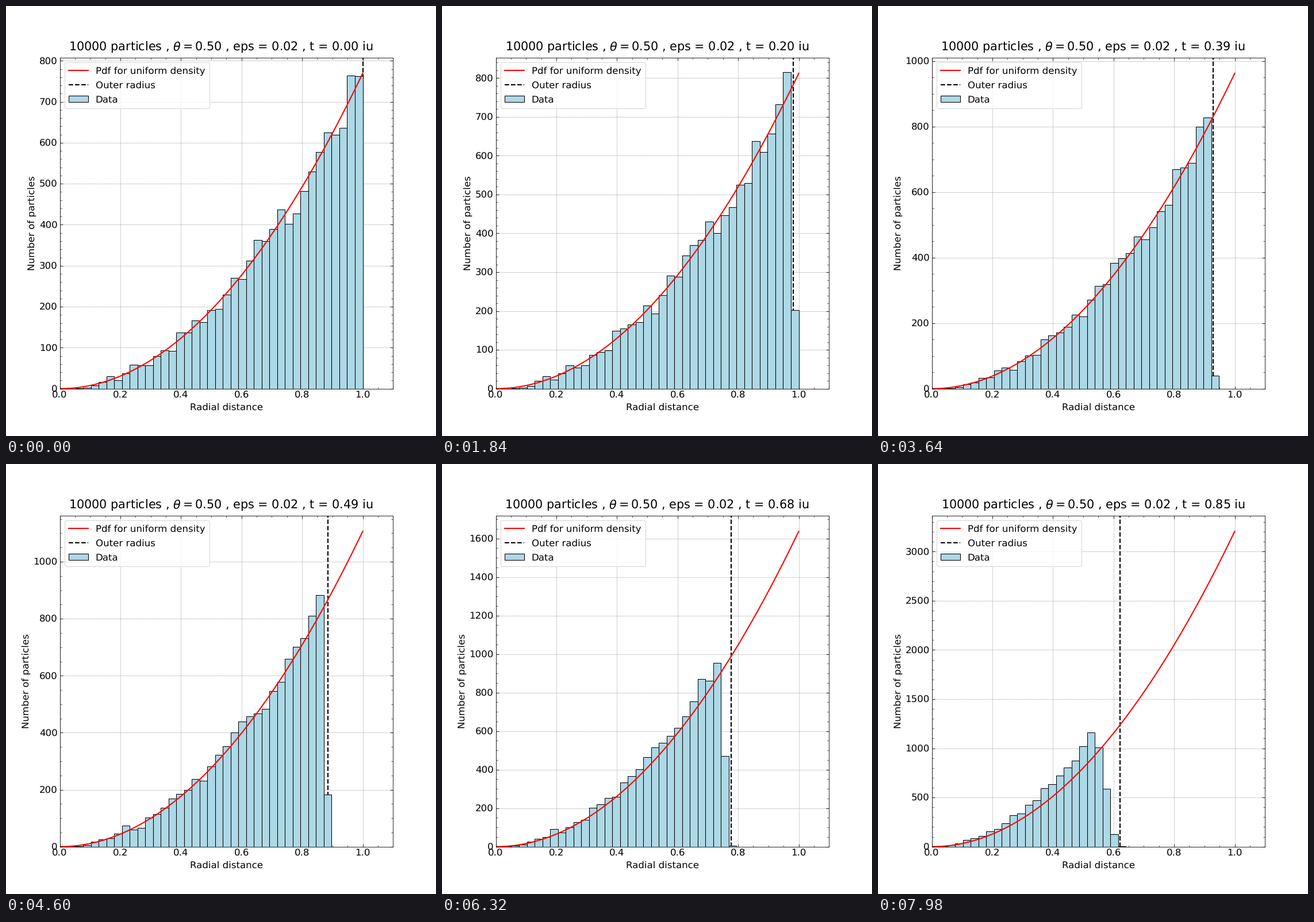
A matplotlib script for the animation above (8000 ms loop, 748 by 748 pixels).

```python
import numpy as np
import matplotlib.pyplot as plt
from matplotlib.animation import FuncAnimation
from matplotlib.ticker import AutoMinorLocator

N, BINS, STEPS = 10000, 39, 171
FRAMES, INTERVAL = 200, 40

plt.rcParams.update({
    "font.family": "DejaVu Sans", "font.size": 16, "text.hinting": "none",
    "xtick.direction": "in", "ytick.direction": "in",
    "xtick.top": True, "ytick.right": True,
    "xtick.major.size": 5, "ytick.major.size": 5,
    "xtick.minor.size": 3, "ytick.minor.size": 3,
    "xtick.major.pad": 4, "axes.labelpad": 4.8,
    "axes.axisbelow": True,
})

edges = np.linspace(0, 1, BINS + 1)
width = edges[1]

# Uniform sphere of particles, each with its own random drift
rng = np.random.default_rng(7)
start = rng.random(N) ** (1 / 3)
drift = rng.standard_normal(N)


def outer_radius(u):
    v = u * u
    return 1 - v * (0.3375 + 0.01875 * v - 0.0136 * v**2 + 0.0359 * v**3)


def radii(u):
    """The sphere shrinks evenly while its edge grows softer."""
    outer = outer_radius(u)
    halo = 0.047 * u**3.15
    r = start * (outer - halo) + 0.43 * halo * drift
    return np.minimum(np.abs(r), outer)


fig, ax = plt.subplots(figsize=(10, 10), dpi=74.8)
bars = ax.bar(edges[:-1], np.zeros(BINS), width, align="edge",
              color="lightblue", edgecolor="black", lw=1, label="Data",
              zorder=1)
x = np.linspace(0, 1, 200)
pdf, = ax.plot(x, x, "r", lw=2, label="Pdf for uniform density")
outer_line = ax.axvline(1, color="black", ls="--", lw=2,
                        label="Outer radius", zorder=0.9)
ax.set_xlim(0, 1.1)
ax.set_xlabel("Radial distance")
ax.set_ylabel("Number of particles")
ax.xaxis.set_minor_locator(AutoMinorLocator())
ax.yaxis.set_minor_locator(AutoMinorLocator())
ax.grid(color="gray", ls="--", lw=0.5)
ax.legend(loc="upper left", labelspacing=0.565, borderpad=0.45)
title = fig.suptitle("", y=0.92, fontsize=20)


def draw(frame):
    step = int((frame + 0.5) * STEPS / FRAMES)
    u = step / (STEPS - 1)
    radius = outer_radius(u)
    counts, _ = np.histogram(radii(u), edges)
    for bar, n in zip(bars, counts):
        bar.set_height(n)
    peak = 3 * N * width / radius**3
    pdf.set_ydata(peak * x**2)
    outer_line.set_xdata([radius, radius])
    ax.set_ylim(0, 1.05 * peak)
    title.set_text(rf"{N} particles , $\theta = 0.50$ , eps = 0.02 , "
                   f"t = {step / 200:.2f} iu")
    return [*bars, pdf, outer_line, title]


anim = FuncAnimation(fig, draw, frames=FRAMES, interval=INTERVAL,
                     init_func=lambda: draw(0), repeat=True)
plt.show()
```
